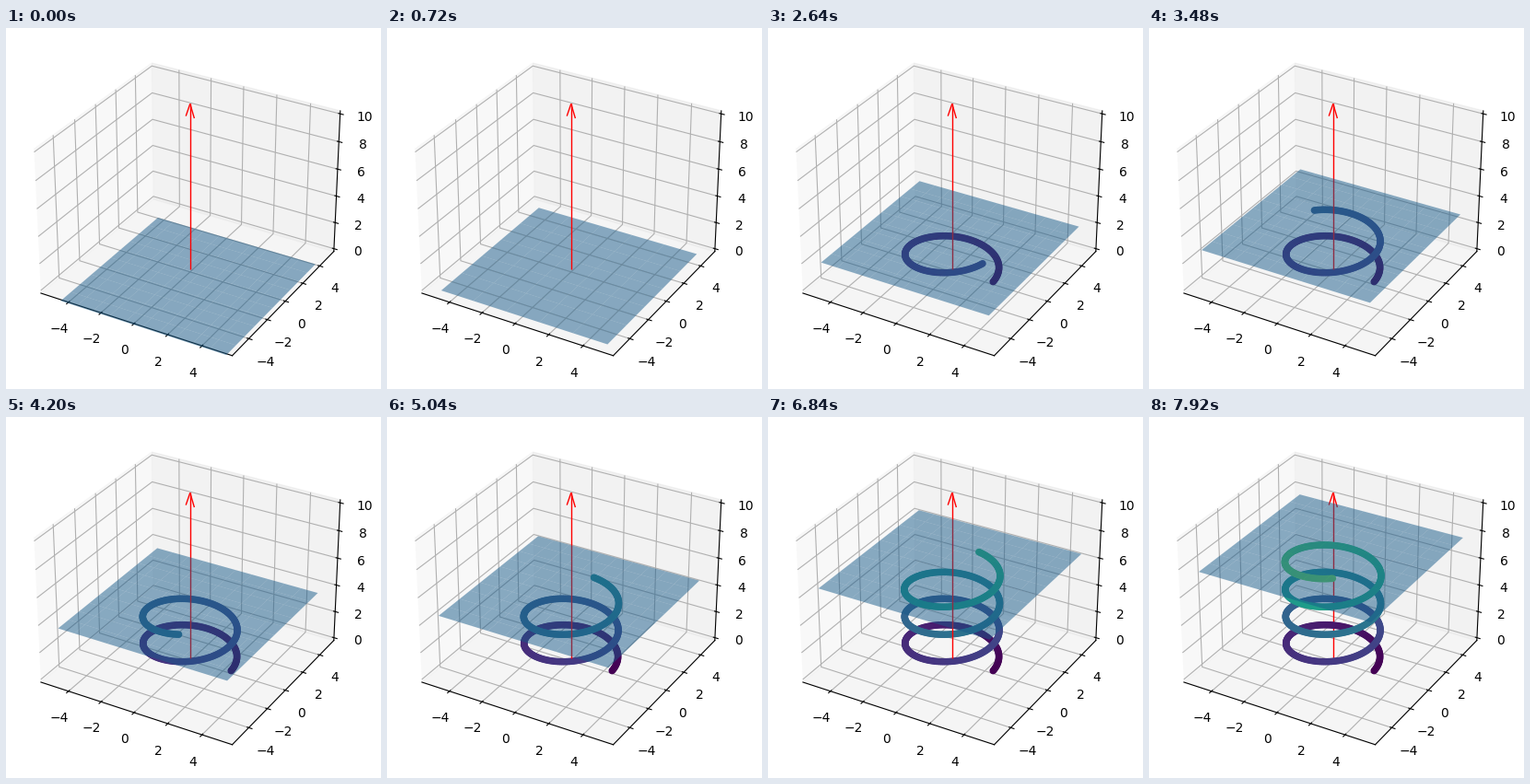
Write a matplotlib script that moves like this. It is 407 px wide and 392 px high and loops after 8 s.

```python
import numpy as np
import matplotlib.pyplot as plt
from matplotlib.animation import FuncAnimation

W, H, DPI = 407, 392, 100
TICK_MS, TICKS, HOLD = 40, 200, 3   # the scene advances every HOLD ticks
SIDE = 369.6                        # side of the square axes, in pixels
LEFT, BOTTOM = 10.0, 12.9

plt.rcParams["font.family"] = "DejaVu Sans"
fig = plt.figure(figsize=(W / DPI + 1e-9, H / DPI + 1e-9), dpi=DPI)
ax = fig.add_axes([LEFT / W, BOTTOM / H, SIDE / W, SIDE / H],
                  projection="3d", computed_zorder=False)
ax.view_init(elev=30, azim=-60)


def padded(low, high):
    pad = (high - low) / 48
    return low - pad, high + pad


ax.set_xlim(*padded(-5.5, 5.5))
ax.set_ylim(*padded(-5.5, 5.5))
ax.set_zlim(*padded(0, 10))
ax.set_xticks(range(-4, 5, 2))
ax.set_yticks(range(-4, 5, 2))
ax.set_zticks(range(0, 11, 2))

arrow = ax.quiver(0, 0, 0, 0, 0, 12, color="red", linewidth=1,
                  arrow_length_ratio=0.08)

levels = np.linspace(-1, 12, 100)
grid_x, grid_y = np.meshgrid(np.arange(-5, 6), np.arange(-5, 6))
helix_z = np.linspace(0, 12, 1000)
helix_x = 2.5 * np.cos(np.pi * helix_z)
helix_y = 2.5 * np.sin(np.pi * helix_z)

moving = []


def update(tick):
    while moving:
        moving.pop().remove()
    level = levels[tick // HOLD]
    plane = ax.plot_surface(grid_x, grid_y, np.full(grid_x.shape, level),
                            color="C0", alpha=0.5)
    plane.set_zorder(5)
    moving.append(plane)

    # the arrow starts on top, then sinks below the plane and the helix
    arrow.set_zorder(6 if level < 0 else 3)
    if level >= 0:
        on = helix_z <= level
        helix = ax.scatter(helix_x[on], helix_y[on], helix_z[on],
                           c=helix_z[on], cmap="viridis", vmin=0, vmax=10,
                           s=20, depthshade=False)
        helix.set_zorder(4 if level > 7.5 else 2)
        moving.append(helix)
    return moving


anim = FuncAnimation(fig, update, frames=TICKS, interval=TICK_MS,
                     init_func=lambda: update(0), blit=False,
                     repeat=True, repeat_delay=0)
plt.show()
```
